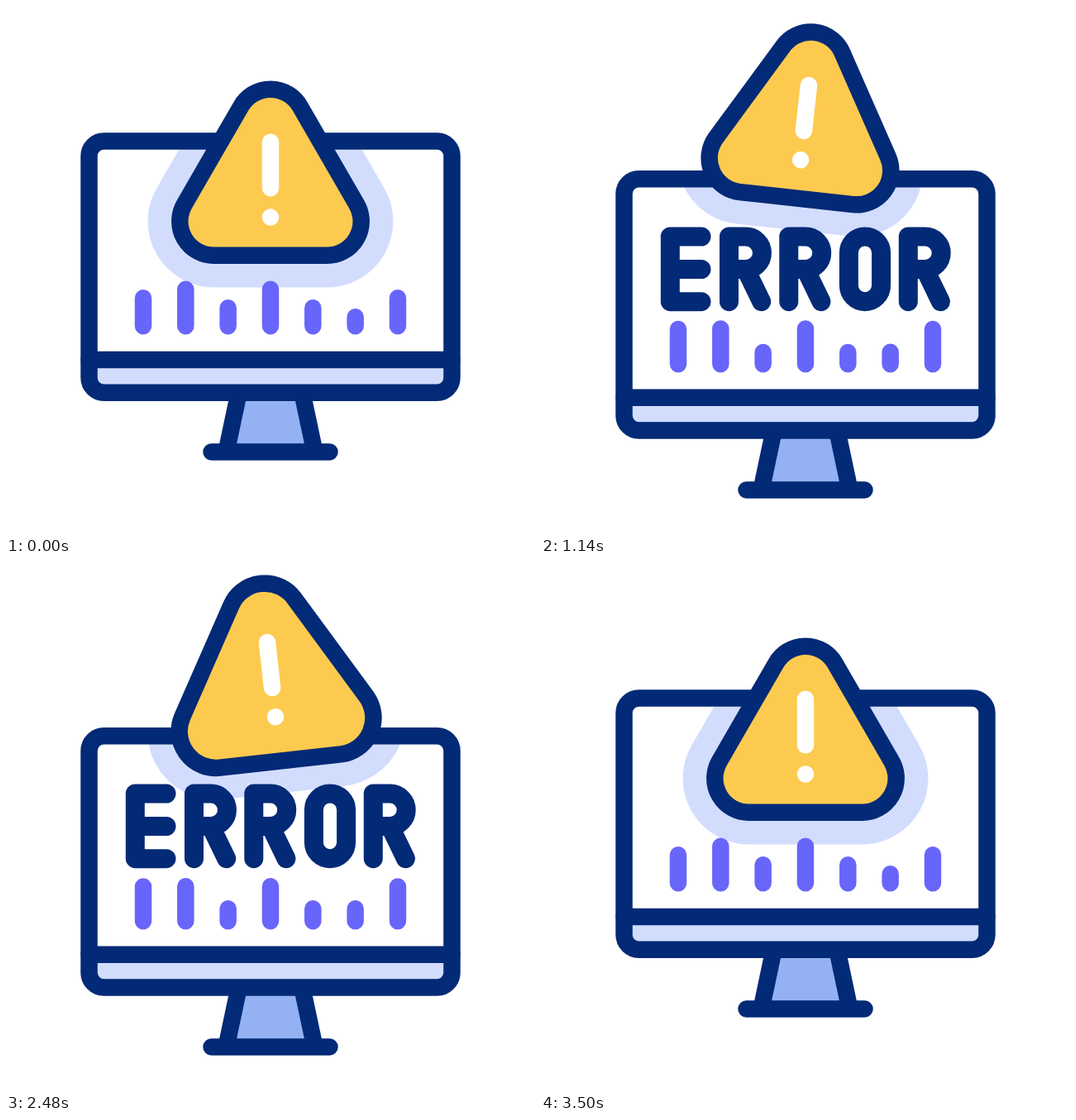
An HTML page that plays this animation: 640x640 px, repeating every 3600 ms.

```html
<!DOCTYPE html>
<html lang="en">
<head>
<meta charset="utf-8">
<title>Error alert</title>
<style>
  html, body { margin: 0; width: 100%; height: 100%; overflow: hidden; background: #fff; }
  svg { display: block; width: 100vw; height: 100vh; }
  .line { fill: none; stroke: #032a76; stroke-width: 20.5; stroke-linecap: round; stroke-linejoin: round; }
  .word { fill: none; stroke: #032a76; stroke-width: 23; stroke-linecap: round; stroke-linejoin: round; }
  .bars { stroke: #6865fa; stroke-width: 20.5; stroke-linecap: round; }
  .mark { stroke: #fff; stroke-width: 20.5; stroke-linecap: round; }
</style>
</head>
<body>
<svg viewBox="0 0 640 640">
  <defs>
    <clipPath id="screen"><rect x="100.5" y="163.4" width="439" height="264"/></clipPath>
    <path id="r" d="M0 357.7V279H20.2a19.75 19.75 0 0 1 0 39.5H0M20.2 318.5L39.2 357.6"/>
  </defs>
  <g id="monitor">
    <path d="M281.7 467.7H358.3L373.5 539.5H266.5Z" fill="#94b1f3"/>
    <path class="line" d="M281.7 467.7L266.5 539.5M358.3 467.7L373.5 539.5M248.5 539.5H391.5"/>
    <rect x="100.5" y="163.4" width="439" height="304.3" rx="18" fill="#fff"/>
    <path d="M100.5 428H539.5V449.7a18 18 0 0 1 -18 18H118.5a18 18 0 0 1 -18 -18Z" fill="#d2ddfe"/>
    <g clip-path="url(#screen)">
      <path id="shadow" fill="#d2ddfe" stroke="#d2ddfe" stroke-width="77.4"/>
    </g>
    <rect class="line" x="100.5" y="163.4" width="439" height="304.3" rx="18"/>
    <path class="line" d="M100.5 427.9H539.5"/>
    <path class="bars" id="bars"/>
  </g>
  <g class="word" id="word" role="img" aria-label="ERROR">
    <path d="M194 279H156.3V357.7H194M156.3 318.5H194"/>
    <use href="#r" x="227.5"/>
    <use href="#r" x="299.8"/>
    <rect x="372.4" y="279" width="39.2" height="78.7" rx="19.6"/>
    <use href="#r" x="444.3"/>
  </g>
  <g id="sign">
    <path class="line" id="tri" style="fill:#fdca50"/>
    <path class="mark" d="M0 -36.2V19.2M0 54.5h.01"/>
  </g>
</svg>
<script>
const LOOP = 3600, DROP = 45.9, RISE = 69, TILT = 7.1, PULSE = 0.083;
const $ = id => document.getElementById(id);
const mix = (a, b, k) => a + (b - a) * k;
const ease = x => {
  x = Math.min(1, Math.max(0, x));
  return x * x * (3 - 2 * x);
};

// Eased value along [time, value] keys.
function track(keys, t) {
  let i = 1;
  while (i < keys.length - 1 && t >= keys[i][0]) i++;
  const [t0, a] = keys[i - 1], [t1, b] = keys[i];
  return mix(a, b, ease((t - t0) / (t1 - t0)));
}

const tiltKeys = [[400, 0], [800, -1], [1200, 1], [1600, -1], [2000, 1], [2400, -1], [2800, 0]];
const pulseKeys = [[400, 0], [800, 1], [1200, 0], [1600, 1], [2000, 0], [2400, 1], [2800, 0]];

// Bar lengths: at rest, at the first swing, at the second swing.
const outer = [54.5, 40.7, 63.4], tall = [65, 32.3, 64.1],
      mid = [42.5, 67.4, 33.8], small = [31.5, 52.2, 34.5];
const bars = [outer, tall, mid, tall, mid, small, outer];
const barKeys = ([rest, a, b]) =>
  [[0, rest], [600, a], [1200, b], [1800, a], [2400, b], [3000, a], [3500, rest]];

function triangle(s) {
  const r = 41.2 * s, x = 68.5 * s, y = 59.5 * s, top = -59.1 * s;
  const c = r * Math.sqrt(3) / 2, h = r / 2, arc = `A${r} ${r} 0 0 0 `;
  return `M${-x} ${y + r}H${x}${arc}${x + c} ${y - h}L${c} ${top - h}` +
    `${arc}${-c} ${top - h}L${-x - c} ${y - h}${arc}${-x} ${y + r}Z`;
}

function draw(t) {
  const p = ease(t / 400) - ease((t - 2800) / 480);
  const down = DROP * p, y = 201 - RISE * p;
  const turn = `rotate(${TILT * track(tiltKeys, t)})`;
  const shape = triangle(1 + PULSE * track(pulseKeys, t));

  $("monitor").setAttribute("transform", `translate(0 ${down})`);
  $("sign").setAttribute("transform", `translate(320 ${y}) ${turn}`);
  $("shadow").setAttribute("transform", `translate(320 ${y - down}) ${turn}`);
  $("tri").setAttribute("d", shape);
  $("shadow").setAttribute("d", shape);
  $("bars").setAttribute("d", bars.map((b, i) =>
    `M${166 + i * 51.33} 387.3v${20.5 - track(barKeys(b), t)}`).join(""));

  const lit = t >= 800 && t < 2800 && t % 800 < 400;
  $("word").setAttribute("visibility", lit ? "visible" : "hidden");
}

const start = performance.now();
function tick() {
  draw((performance.now() - start) % LOOP);
  requestAnimationFrame(tick);
}
draw(0);
requestAnimationFrame(tick);
</script>
</body>
</html>
```
